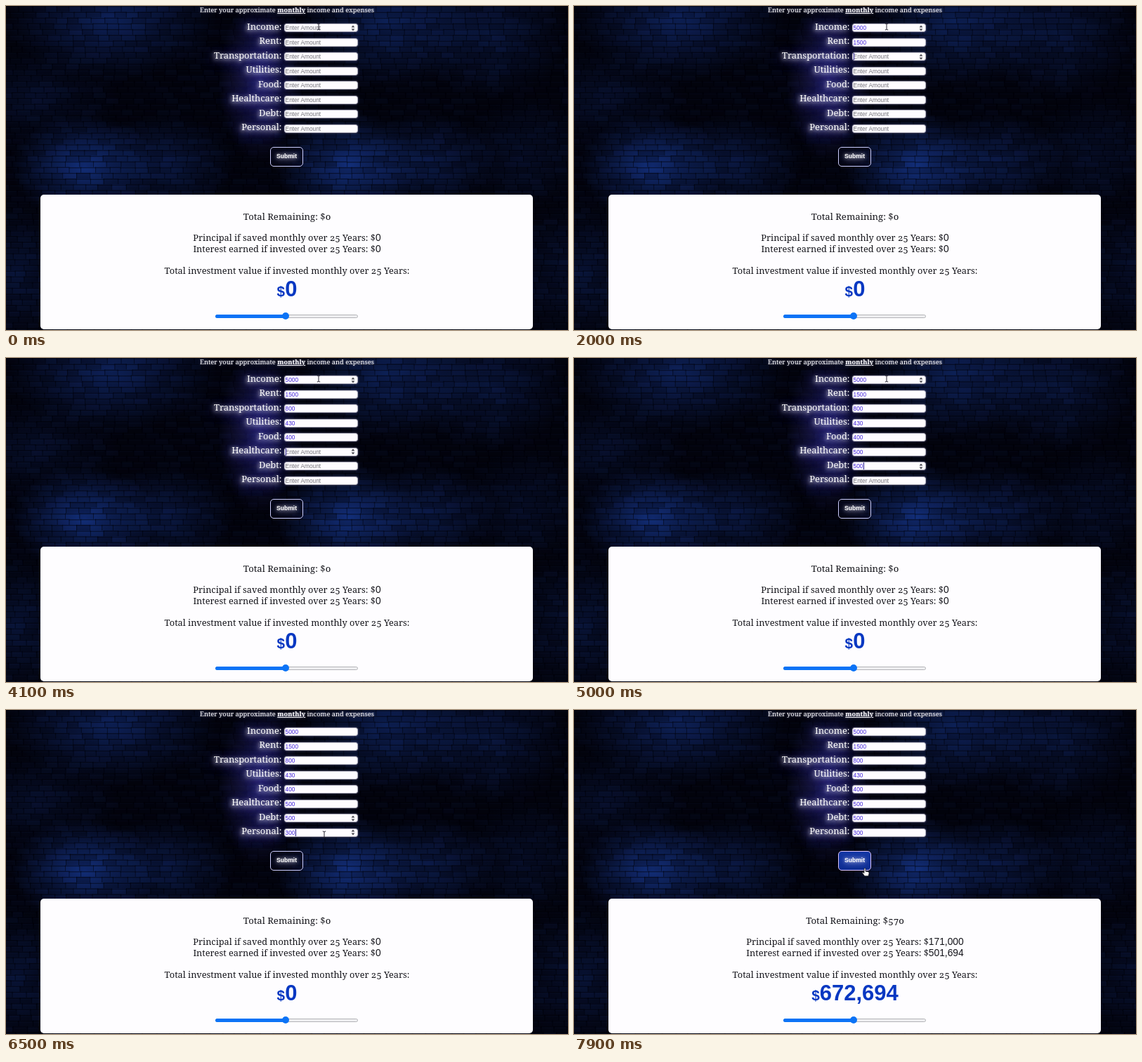
An HTML page with a canvas for the animation above (8000 ms loop, 800 by 462 pixels).

```html
<!DOCTYPE html>
<html lang="en">
<head>
<meta charset="utf-8">
<title>Budget calculator</title>
<style>
  html, body { margin: 0; width: 100%; height: 100%; overflow: hidden; background: #02030d; }
  #stage { position: relative; width: 800px; height: 462px; overflow: hidden; }
  #stage > *, .field > * { position: absolute; box-sizing: border-box; }
  #wall { left: 0; top: 0; }
  .line {
    left: 0; width: 800px; text-align: center; white-space: nowrap;
    font: 12.75px/20px "Noto Serif", Georgia, serif; color: #16161c;
    font-variant-numeric: oldstyle-nums;
  }
  .line span, .total { font-family: "Liberation Sans", Arial, sans-serif; font-variant-numeric: normal; }
  .line span { font-size: 13.8px; }
  .remaining { top: 290px; font-size: 13.15px; }
  .title { top: -4px; font-size: 9.35px; color: #fff; text-shadow: 0 0 3px #88a; }
  .label {
    left: 200px; width: 192.5px; text-align: right; font-size: 12.9px; color: #fff;
    text-shadow: -1px 1px 5px #ffffffc0, -2px 3px 9px #c9c4ffb0, -3px 3px 18px #6a66e8;
  }
  .field {
    left: 396px; width: 105px; height: 12px; border-radius: 3.5px; background: #fefcff;
    border: 1px solid #b6b4c2; box-shadow: 0 0 3px #b9b5ee70;
    font: 8.35px/10px "Liberation Sans", Arial, sans-serif; color: #4628dc;
  }
  .value { left: .6px; top: 0; white-space: nowrap; }
  .value.empty { color: #77767c; }
  .caret { top: 0; width: 1px; height: 10px; background: #2a1e90; }
  .spin { right: 3px; top: .5px; width: 6px; height: 9px; }
  #submit {
    left: 376px; top: 201px; width: 47px; height: 28px; border: 1.3px solid #cdcdfa; border-radius: 5px;
    background: #04061c80; color: #fff; text-align: center;
    font: bold 8.6px/25px "Liberation Sans", Arial, sans-serif;
    text-shadow: 0 0 4px #ffffff90, 0 1px 8px #cfcaff;
  }
  #submit.hover { background: linear-gradient(#1236a4, #0d2c92); border-color: #dcc4fa; }
  #card { left: 49px; top: 269px; width: 701px; height: 192px; border-radius: 5px; background: #fefdff; }
  .total { left: 0; top: 384px; width: 800px; text-align: center; color: #0838c2; font-weight: bold; font-size: 31px; line-height: 40px; }
  .total small { font-size: 20.7px; }
  #track { left: 298px; top: 440px; width: 203px; height: 5px; border: 1px solid #b4b4b8; border-radius: 3px; background: #efeff1; }
  #fill { left: 298px; top: 440px; width: 100px; height: 5px; border-radius: 3px; background: #0b73f6; }
  #thumb { left: 393px; top: 437px; width: 10px; height: 10px; border-radius: 50%; background: #0b73f6; }
  #cursor { left: 0; top: 0; width: 20px; height: 20px; overflow: visible; }
</style>
</head>
<body>
<div id="stage">
  <canvas id="wall" width="800" height="462"></canvas>
  <div class="line title">Enter your approximate <b><u>monthly</u></b> income and expenses</div>
  <div id="submit">Submit</div>
  <div id="card"></div>
  <div class="line remaining">Total Remaining: $<b id="left" style="font-weight:400"></b></div>
  <div class="line" style="top:320px">Principal if saved monthly over 25 Years: $<span id="saved"></span></div>
  <div class="line" style="top:335.5px">Interest earned if invested over 25 Years: $<span id="interest"></span></div>
  <div class="line" style="top:367px">Total investment value if invested monthly over 25 Years:</div>
  <div class="total"><small>$</small><span id="total"></span></div>
  <div id="track"></div><div id="fill"></div><div id="thumb"></div>
  <svg id="cursor">
    <path id="ibeam" d="M-2.2-4.5Q0-4.5 0-3.5Q0-4.5 2.2-4.5M0-3.5V3.5M-2.2 4.5Q0 4.5 0 3.5Q0 4.5 2.2 4.5" fill="none" stroke="#25232e" stroke-width="1"/>
    <path id="arrow" d="M0 0V10L2.4 7.8L4 11.4L5.5 10.7L4 7.3H7.2Z" fill="#fff" stroke="#000" stroke-width=".7"/>
    <path id="hand" d="M-1 .8Q0-.8 1 .8V4.5L5 5.3Q6.3 5.8 6 7.6L5 11.3H-.2L-3.6 6.8Q-3.4 5.4-2 6.2L-1 7Z" fill="#fff" stroke="#111" stroke-width=".7"/>
  </svg>
</div>
<script>
const LOOP = 8000, CLICK = 7400, HOVER = 7000;
const $ = id => document.getElementById(id);
const stage = $('stage');

function paintWall() {
  const g = $('wall').getContext('2d');
  let seed = 11;
  const rand = () => (seed = seed * 16807 % 2147483647) / 2147483647;
  g.fillStyle = '#02030d';
  g.fillRect(0, 0, 800, 462);
  // x, y, horizontal radius, vertical radius, strength
  const lights = [
    [150, 20, 150, 85, .55], [550, 25, 130, 90, .55], [690, 40, 110, 90, .35],
    [112, 228, 105, 72, .8], [225, 225, 100, 70, .4],
    [488, 228, 105, 75, .8], [600, 222, 100, 70, .42],
    [40, 130, 120, 70, .2], [740, 210, 90, 80, .22],
    [15, 380, 80, 100, .3], [790, 380, 70, 100, .22]
  ];
  const glow = (x, y, rx, ry, a, rgb) => {
    g.save();
    g.translate(x, y);
    g.scale(rx, ry);
    const fade = g.createRadialGradient(0, 0, 0, 0, 0, 1);
    fade.addColorStop(0, `rgba(${rgb},${a})`);
    fade.addColorStop(.5, `rgba(${rgb},${a * .5})`);
    fade.addColorStop(1, `rgba(${rgb},0)`);
    g.fillStyle = fade;
    g.fillRect(-1, -1, 2, 2);
    g.restore();
  };
  for (const light of lights) glow(...light, '22,56,146');
  for (let row = 0, y = 0; y < 462; row++, y += 8.2) {
    for (let x = row % 2 * -9 - rand() * 4; x < 800;) {
      const w = 15 + rand() * 6, shade = rand();
      g.fillStyle = shade < .6 ? `rgba(0,0,10,${shade * .5})` : `rgba(40,70,170,${(shade - .6) * .12})`;
      g.fillRect(x, y, w, 8.2);
      g.fillStyle = 'rgba(0,0,8,.5)';
      g.fillRect(x, y, 1, 8.2);
      g.fillRect(x, y + rand() * .7, w, 1.4);
      g.fillStyle = 'rgba(60,90,190,.06)';
      g.fillRect(x + 1, y + 1.7, w - 2, 1);
      x += w;
    }
  }
  glow(362, 105, 60, 115, .45, '70,66,190');
}

const names = ['Income', 'Rent', 'Transportation', 'Utilities', 'Food', 'Healthcare', 'Debt', 'Personal'];
const fields = names.map((name, i) => {
  const y = 30.5 + i * 20.5;
  const label = document.createElement('div');
  label.className = 'line label';
  label.style.top = y - 11.7 + 'px';
  label.textContent = name + ':';
  const box = document.createElement('div');
  box.className = 'field';
  box.style.top = y - 5.5 + 'px';
  box.innerHTML = '<div class="value"></div><div class="caret"></div>' +
    '<svg class="spin" viewBox="0 0 6 9"><path d="M.6 3.4L3 .6L5.4 3.4ZM.6 5.6L3 8.4L5.4 5.6Z" fill="#45444c"/></svg>';
  stage.insertBefore(label, $('submit'));
  stage.insertBefore(box, $('submit'));
  return { value: box.children[0], caret: box.children[1], spin: box.children[2] };
});

// time, focused row, its text
const keys = [
  [100, 0, ''], [300, 0, '5'], [500, 0, '50'], [600, 0, '500'], [800, 0, '5000'],
  [1000, 1, ''], [1400, 1, '1'], [1600, 1, '150'], [1700, 1, '1500'],
  [2000, 2, ''], [2200, 2, '8'], [2400, 2, '80'], [2500, 2, '800'],
  [2800, 3, ''], [3000, 3, '4'], [3100, 3, '43'], [3200, 3, '430'],
  [3500, 4, ''], [3800, 4, '4'], [3900, 4, '40'], [4000, 4, '400'],
  [4100, 5, ''], [4200, 5, '5'], [4400, 5, '500'],
  [4600, 6, '5'], [4800, 6, '500'],
  [5200, 7, ''], [5300, 7, '3'], [5600, 7, '300']
];

// time, x, y of the pointer
const path = [
  [0, 445, 29.5], [6100, 445, 29.5], [6300, 448, 92], [6400, 452, 152], [6500, 453, 177.5],
  [6700, 450, 182], [6800, 437, 199], [7000, 399, 225], [7200, 401, 225.5],
  [7800, 401, 225.5], [7900, 414, 225.5], [8000, 414, 225.5]
];

function pointer(t) {
  const i = path.findIndex(p => p[0] > t);
  const [t0, x0, y0] = path[i - 1], [t1, x1, y1] = path[i];
  const k = (t - t0) / (t1 - t0);
  return [x0 + (x1 - x0) * k, y0 + (y1 - y0) * k];
}

function setText(el, text) {
  if (el.textContent !== text) el.textContent = text;
}
const show = (el, on) => { el.style.display = on ? '' : 'none'; };

function render(now) {
  const t = Math.floor(now % LOOP / 100) * 100;
  const texts = names.map(() => '');
  let focus = -1;
  for (const [at, row, text] of keys) {
    if (at > t) break;
    texts[row] = text;
    focus = row;
  }
  const done = t >= CLICK;
  if (done) focus = -1;

  const [x, y] = pointer(t);
  const overRow = y < 184 ? Math.round((y - 30.5) / 20.5) : -1;
  const caretOn = t < 6000 || t >= 6500;

  fields.forEach((f, i) => {
    setText(f.value, texts[i] || 'Enter Amount');
    f.value.classList.toggle('empty', !texts[i]);
    show(f.caret, i === focus && caretOn);
    f.caret.style.left = 1 + texts[i].length * 4.64 + 'px';
    show(f.spin, i === focus || i === overRow || (i === 6 && t === 6500));
  });

  $('submit').classList.toggle('hover', t >= HOVER);
  setText($('left'), done ? '570' : '0');
  setText($('saved'), done ? '171,000' : '0');
  setText($('interest'), done ? '501,694' : '0');
  setText($('total'), done ? '672,694' : '0');

  const shape = t >= HOVER ? 'hand' : overRow >= 0 ? 'ibeam' : 'arrow';
  for (const id of ['ibeam', 'arrow', 'hand']) show($(id), id === shape);
  $('cursor').style.transform = `translate(${x}px, ${y}px)`;
}

paintWall();
const start = performance.now();
function tick() {
  render(performance.now() - start);
  requestAnimationFrame(tick);
}
tick();
</script>
</body>
</html>
```
